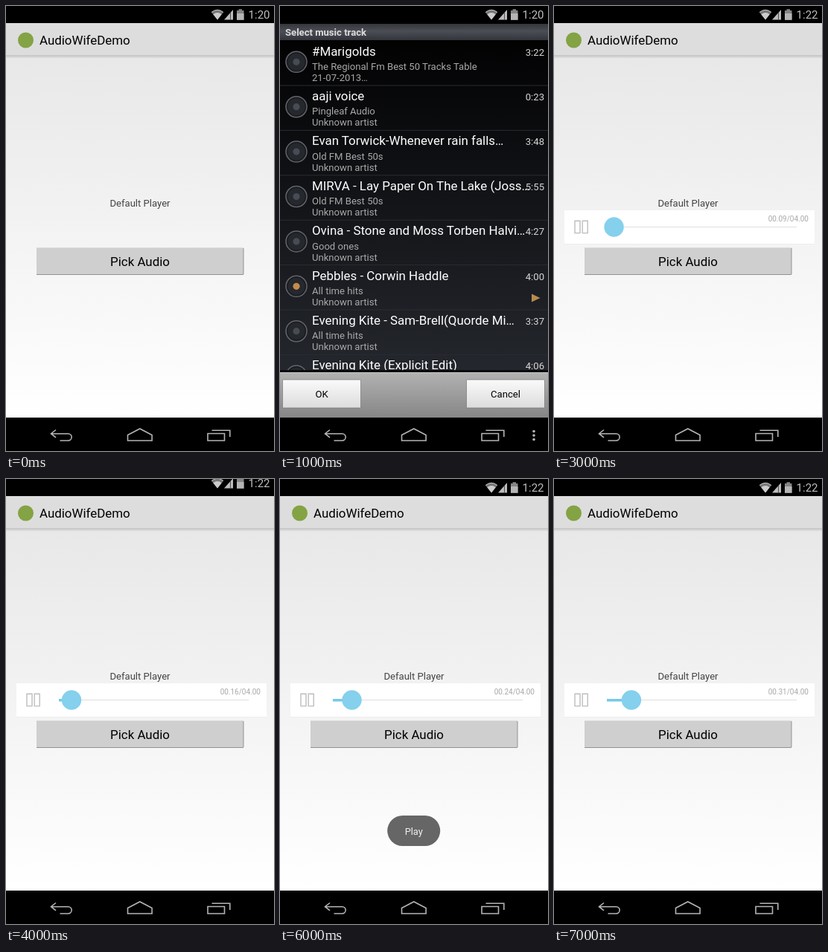
These frames come from a looping animation (360 px wide and 599 px high, 8000 ms). An HTML page:

```html
<!DOCTYPE html>
<html lang="en">
<head>
<meta charset="utf-8">
<title>Audio player demo</title>
<style>
  html, body { margin: 0; width: 100%; height: 100%; overflow: hidden; background: #000; }
  svg { display: block; width: 100vw; height: 100vh; }
  text { font-family: Roboto, sans-serif; font-size: 13.1px; white-space: pre; }
  .big { font-size: 16.9px; }
  .mid { text-anchor: middle; }
  .end { text-anchor: end; }
  .line { fill: none; stroke: #b4b4b4; stroke-width: 1.6; }
  .ctrl { fill: none; stroke: #bdbdbd; stroke-width: 1.4; }
</style>
</head>
<body>
<svg viewBox="0 0 360 599">
  <defs>
    <linearGradient id="page" x2="0" y2="1"><stop stop-color="#e8e8e8"/><stop offset="1" stop-color="#fff"/></linearGradient>
    <linearGradient id="listBg" x2="0" y2="1"><stop stop-color="#020203"/><stop offset="1" stop-color="#24272d"/></linearGradient>
    <linearGradient id="head" x2="0" y2="1"><stop stop-color="#34363b"/><stop offset=".45" stop-color="#4b4e55"/><stop offset="1" stop-color="#33353b"/></linearGradient>
    <linearGradient id="foot" x2="0" y2="1"><stop stop-color="#b2b2b2"/><stop offset="1" stop-color="#868686"/></linearGradient>
    <linearGradient id="key" x2="0" y2="1"><stop stop-color="#fafafa"/><stop offset="1" stop-color="#dcdcdc"/></linearGradient>
    <clipPath id="listClip"><rect y="46" width="360" height="445"/></clipPath>
  </defs>
  <rect width="360" height="599"/>

  <g id="home">
    <rect y="68" width="360" height="486" fill="url(#page)"/>
    <rect y="23" width="360" height="44" fill="#ddd"/>
    <rect y="66" width="360" height="2" fill="#c9c9c9"/>
    <rect y="68" width="360" height="2" fill="#d9d9d9"/>
    <circle cx="26.5" cy="46" r="10.5" fill="#83a344"/>
    <text class="big" x="45" y="52">AudioWifeDemo</text>
    <text class="mid" x="180" y="270" font-size="13.3" fill="#444">Default Player</text>
    <rect x="41" y="325" width="278" height="36" fill="#cfcfcf"/>
    <path d="M41 325.5h278" stroke="#dadada"/>
    <path d="M41 361.5h278M319 326v35" stroke="#929292"/>
    <text class="big mid" x="180" y="350">Pick Audio</text>
  </g>

  <g id="player">
    <rect x="14" y="275" width="336" height="45" fill="#fff"/>
    <path d="M14 320.5h336" stroke="#ededed"/>
    <path id="pause" class="ctrl" d="M28 289.2h7v16.4h-7zM38.2 289.2h7v16.4h-7z"/>
    <path id="play" class="ctrl" d="M28 288l17 9.5l-17 9.5z"/>
    <path d="M71 297.5h255" stroke="#dedede"/>
    <rect id="progress" x="71" y="296" height="3.5" fill="#76c9e9"/>
    <circle id="thumb" cy="297.5" r="13.2" fill="#84d0ed"/>
    <text id="time" class="end" x="342" y="290" style="font-size:10px" fill="#a8a8a8"></text>
  </g>

  <g id="toast">
    <rect id="bubble" y="453" height="41" rx="20.5" fill="#666"/>
    <text id="message" class="mid" x="179.7" y="479" style="font-size:12.8px" fill="#f0f0f0"></text>
  </g>

  <g id="picker">
    <rect y="24" width="360" height="22" fill="url(#head)"/>
    <text x="7" y="40" font-weight="700" fill="#dcdcdc">Select music track</text>
    <rect y="46" width="360" height="447" fill="url(#listBg)"/>
    <g id="rows" clip-path="url(#listClip)"></g>
    <rect y="490" width="360" height="3" fill="#08090a"/>
    <rect y="493" width="360" height="61" fill="url(#foot)"/>
    <path d="M0 493.5h360" stroke="#c8c8c8"/>
    <g fill="url(#key)" stroke="#777" stroke-width=".7">
      <rect x="3.5" y="503" width="105" height="38" rx="1"/>
      <rect x="250.5" y="503" width="105" height="38" rx="1"/>
    </g>
    <text class="mid" x="56" y="527">OK</text>
    <text class="mid" x="303" y="527">Cancel</text>
    <g fill="#b4b4b4">
      <circle cx="341" cy="572.5" r="1.8"/><circle cx="341" cy="578" r="1.8"/><circle cx="341" cy="583.5" r="1.8"/>
    </g>
  </g>

  <g id="status">
    <path d="M276 8.5Q284 2 292 8.5L284 18.5z" fill="#777"/>
    <path d="M278.3 11.2Q284 7 289.7 11.2L284 18.5z" fill="#ccc"/>
    <path d="M276 8.5Q284 2 292 8.5" fill="none" stroke="#ccc"/>
    <path d="M293 18.5L305 5v13.5z" fill="#bdbdbd"/>
    <path d="M301.5 9v9.5" stroke="#333" stroke-width=".8"/>
    <path d="M310 6h2.5v-1.7h4.5v1.7h2.5v12.7h-9.5z" fill="#858585"/>
    <path d="M310 10h9.5v8.7h-9.5z" fill="#b5b5b5"/>
    <text id="clock" class="end" x="354.5" y="17.3" style="font-size:15px" fill="#bebebe"></text>
  </g>

  <g class="line">
    <path d="M67 570.5l-6.5 5.2l6.5 5.2M61 575.7h22.5a4.6 4.6 0 0 1 0 9.3h-11"/>
    <path d="M163.5 585v-7.5l16.3-8.5l16.3 8.5v7.5z"/>
    <path d="M271 575.5h22.5v9.5h-22.5zM276.5 571.3h24.3v8.7"/>
  </g>
</svg>
<script>
const $ = id => document.getElementById(id);
const STEP = 1000;

const scenes = [
  { clock: "1:20" },
  { clock: "1:20", picker: true },
  { clock: "1:21", at: 2, playing: true, toast: "Play" },
  { clock: "1:22", at: 9, playing: true },
  { clock: "1:22", at: 16, playing: true, lift: 6 },
  { clock: "1:22", at: 22, toast: "Pause" },
  { clock: "1:22", at: 24, playing: true, toast: "Play" },
  { clock: "1:22", at: 31, playing: true },
];

const UNKNOWN = "Unknown artist";
const tracks = [
  ["#Marigolds", "3:22", "The Regional Fm Best 50 Tracks Table", "21-07-2013…"],
  ["aaji voice", "0:23", "Pingleaf Audio", UNKNOWN],
  ["Evan Torwick-Whenever rain falls…", "3:48", "Old FM Best 50s", UNKNOWN],
  ["MIRVA - Lay Paper On The Lake (Joss…", "5:55", "Old FM Best 50s", UNKNOWN],
  ["Ovina - Stone and Moss Torben Halvi…", "4:27", "Good ones", UNKNOWN],
  ["Pebbles - Corwin Haddle", "4:00", "All time hits", UNKNOWN],
  ["Evening Kite - Sam-Brell(Quorde Mi…", "3:37", "All time hits", UNKNOWN],
  ["Evening Kite (Explicit Edit)", "4:06", "", ""],
];
const SELECTED = 5;

$("rows").innerHTML = tracks.map(([title, length, album, artist], i) => `
  <g transform="translate(0 ${(i * 60.4).toFixed(1)})">
    <circle cx="22" cy="75.3" r="14" fill="#1a1c20" stroke="#62656b" stroke-width="1.5"/>
    <circle cx="22" cy="75.3" r="11.5" fill="#25282d"/>
    <circle cx="22" cy="75.3" r="4.6" fill="${i === SELECTED ? "#c48b4b" : "#474b53"}"/>
    <text class="big" x="43" y="66.5" fill="#fff">${title}</text>
    <text class="end" x="355" y="66.5" fill="#d6d6d6">${length}</text>
    <g fill="#a9a9a9"><text x="43" y="86">${album}</text><text x="43" y="101">${artist}</text></g>
    ${i === SELECTED ? '<path d="M338 85.5l11.5 5.5l-11.5 5.5z" fill="#b88a4d"/>' : ""}
    <path d="M0 107h360" stroke="#292c31"/>
  </g>`).join("");

const show = (id, on) => $(id).setAttribute("display", on ? "inline" : "none");
const set = (id, attrs) => Object.entries(attrs).forEach(([k, v]) => $(id).setAttribute(k, v));

function draw({ clock, picker, at, playing, toast, lift = 0 }) {
  const hasPlayer = at !== undefined;
  show("home", !picker);
  show("picker", picker);
  show("player", hasPlayer);
  show("toast", toast);
  $("clock").textContent = clock;
  set("status", { transform: `translate(0 ${-lift})` });
  if (hasPlayer) {
    const travel = 255 * at / 240;
    show("pause", playing);
    show("play", !playing);
    set("progress", { width: travel });
    set("thumb", { cx: 71 + travel });
    $("time").textContent = `00.${String(at).padStart(2, "0")}/04.00`;
  }
  if (toast) {
    const width = toast === "Play" ? 71 : 81;
    set("bubble", { x: 179.7 - width / 2, width });
    $("message").textContent = toast;
  }
}

const start = performance.now();
let shown = -1;
function tick(now) {
  const index = Math.floor(Math.max(0, now - start) / STEP) % scenes.length;
  if (index !== shown) draw(scenes[shown = index]);
  requestAnimationFrame(tick);
}
tick(start);
</script>
</body>
</html>
```
